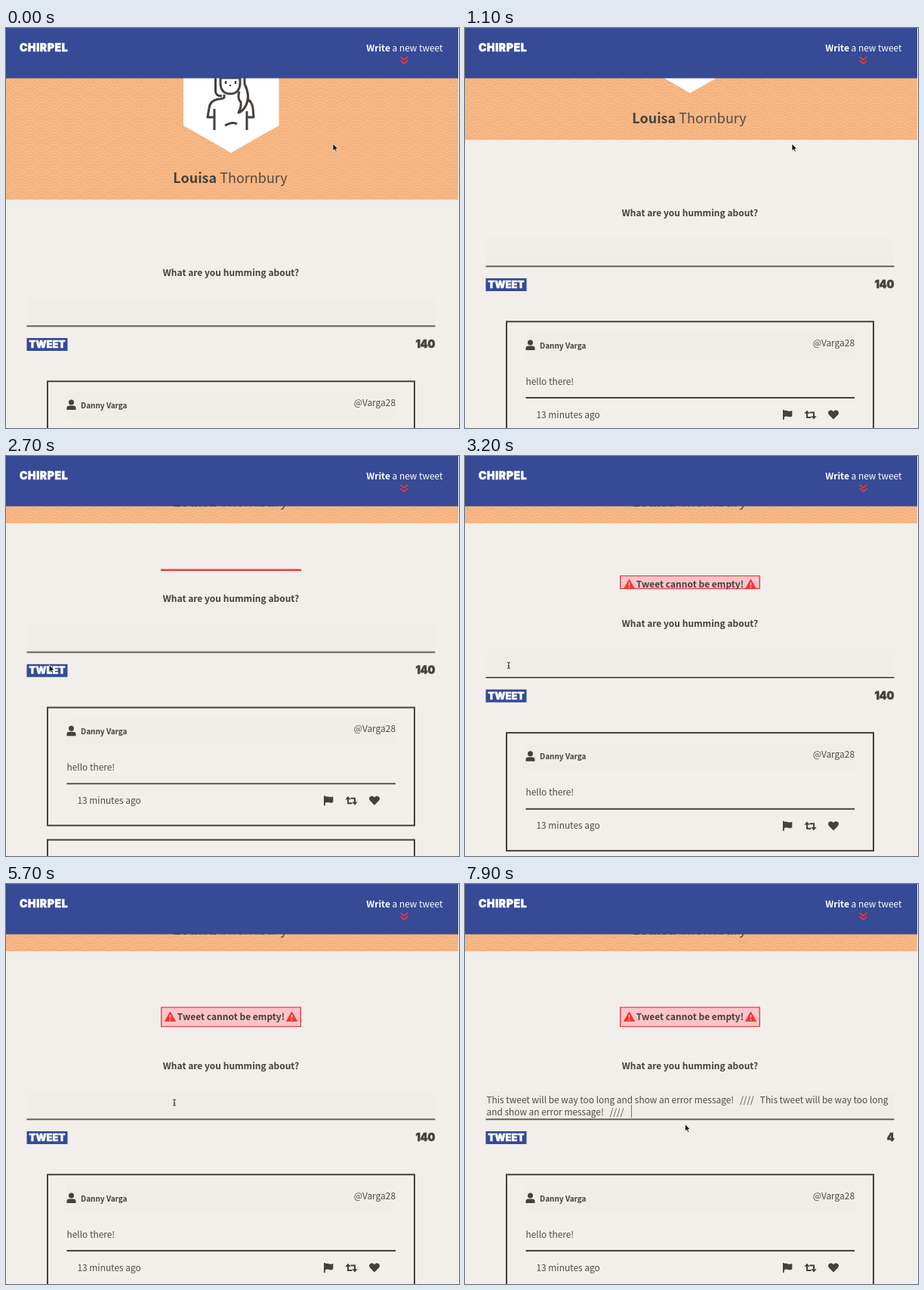
Write an HTML page that moves like this. It is 600 by 529 pixels and loops after 8000 ms.

```html
<!DOCTYPE html>
<html lang="en">
<head>
<meta charset="utf-8">
<title>New tweet</title>
<style>
html, body { margin: 0; width: 100%; height: 100%; overflow: hidden; background: #f2eeea }
#stage { display: block; width: 600px; height: 529px }
text { font: 400 11.9px 'Noto Sans CJK JP', 'Noto Sans CJK SC', 'Noto Sans CJK KR', 'Source Sans Pro', sans-serif; fill: #504b47; white-space: pre }
.bold { font-weight: 700; font-size: 12px; fill: #45413e }
.small { font-size: 10px }
.name { font-size: 18px }
.light { fill: #fff }
.block { font: 900 13px Inter, sans-serif; fill: #45413e; stroke: #45413e; stroke-width: .5 }
.block.light { fill: #fff; stroke: #fff }
.mid { text-anchor: middle }
.end { text-anchor: end }
.line { fill: none; stroke: #45413e; stroke-width: 2 }
.dark { fill: #45413e }
.tint { fill: #f0ede7 }
</style>
</head>
<body>
<svg id="stage" viewBox="0 0 600 529">
  <defs>
    <pattern id="waves" width="32" height="16" patternUnits="userSpaceOnUse">
      <rect width="32" height="16" fill="#f8b986"/>
      <g id="scales" fill="#f8b986" stroke="#eba876" stroke-width=".8"></g>
    </pattern>
    <g id="warn">
      <path d="M0-6.5L7 5.8H-7Z" fill="#ee3838" stroke="#ee3838" stroke-linejoin="round"/>
      <path d="M0-2.5V1.5M0 3V4.6" stroke="#fbc4c6" stroke-width="1.6"/>
    </g>
  </defs>
  <rect width="600" height="529" fill="#f2eeea"/>

  <g id="page">
    <rect width="599" height="227" fill="url(#waves)"/>
    <path d="M235 0H361.5V129L298 165L235 129Z" fill="#fff"/>
    <g class="line" style="stroke-width:3" stroke-linejoin="round">
      <path d="M277.5 40V84Q278 90 286 90M284 55V74Q285 87 297 87T310 74V55M284 66H310"/>
      <path d="M291 70V74M304 70V74M297 75V77" style="stroke-width:2.4"/>
      <path d="M289 88V92Q287 94 281 94Q270 96 269 106L267 118H276M276 107V135"/>
      <path d="M316 50V74Q324 90 318 102Q314 110 308 112Q312 104 311 98Q306 93 309 84"/>
      <path d="M319 94Q326 97 327 106L328 118H319M319 110V135M290 129Q300 123 306 127"/>
    </g>
    <text class="name mid" x="297" y="204.5"><tspan class="bold name">Louisa</tspan> Thornbury</text>

    <svg id="alert" x="205" width="186">
      <rect id="frame" x=".7" y=".7" width="184.6" fill="#fbc4c6" stroke="#e5404a" stroke-width="1.4"/>
      <g id="message">
        <use href="#warn" x="12.5" y="-4.3"/>
        <text class="bold mid" x="93" y="0">Tweet cannot be empty!</text>
        <use href="#warn" x="173.5" y="-4.3"/>
      </g>
    </svg>

    <g id="below">
      <text class="bold mid" x="298" y="327.5">What are you humming about?</text>
      <rect class="tint" x="28" y="357" width="540" height="36"/>
      <path class="line" d="M27.5 394.2H568.5" style="stroke:#64605d"/>
      <text id="row1" x="28.5" y="372.5"></text>
      <text id="row2" x="28.5" y="388.5"></text>
      <path id="caret" d="M0 0V17" stroke="#777" stroke-width="1"/>
      <rect x="27.5" y="410" width="54" height="17" fill="#364a96"/>
      <text class="block light mid" x="54.5" y="423">TWEET</text>
      <text id="count" class="block end" x="568.5" y="423" style="font-size:14px"></text>

      <rect class="line" x="55" y="467.3" width="486" height="156"/>
      <rect class="line" x="55" y="642.3" width="486" height="156"/>
      <rect class="tint" x="80.5" y="480" width="435" height="37"/>
      <circle class="dark" cx="86.5" cy="495" r="3.5"/>
      <path class="dark" d="M80.5 505V502.5Q80.5 499.5 84 499.5H89Q92.5 499.5 92.5 502.5V505Z"/>
      <text class="bold small" x="99" y="502.5">Danny Varga</text>
      <text class="end" x="516" y="500">@Varga28</text>
      <text x="80.5" y="550.5">hello there!</text>
      <path class="line" d="M80.5 568H516" style="stroke-width:1.8"/>
      <text x="94.5" y="594.5">13 minutes ago</text>
      <path class="dark" d="M421 584V597H422.8V593.4Q425.5 592 428 593T433.3 592.6V585Q430.5 586.3 428 585.4T422.8 585V584Z"/>
      <path class="line" d="M453 587V594H458.5M462 594.5V587.5H456.5"/>
      <path class="dark" d="M449.3 589L453 584.8L456.7 589ZM458.3 592.3L462 596.5L465.7 592.3Z"/>
      <path class="dark" d="M488 596.5L482 590.4C478.5 586 485 581.8 488 586.4C491 581.8 497.500 586 494 590.400Z"/>
    </g>
  </g>

  <rect width="600" height="66.500" fill="#364a96"/>
  <text class="block light" x="18" y="31" style="font-size:14px;letter-spacing:.6px">CHIRPEL</text>
  <text class="light end" x="578.5" y="31"><tspan class="bold light">Write</tspan> a new tweet</text>
  <path d="M522.5 38L527.5 42L532.5 38M522.5 43L527.5 47L532.5 43" fill="none" stroke="#e5353f" stroke-width="2"/>
  <rect x="599" width="1" height="529" fill="#f7f5f3"/>

  <path id="arrow" d="M0 0V9.5L2.2 7.6L3.8 11L5.3 10.300L3.8 7.100H6.700Z" fill="#111" stroke="#fff" stroke-width=".7"/>
  <path id="beam" d="M-2-4Q0-4 0-3Q0-4 2-4M0-3V3M-2 4Q0 4 0 3Q0 4 2 4M-1 .8H1" fill="none" stroke="#222"/>
</svg>
<script>
const LOOP = 8000, SCROLL = 138;
const FIRST_PASTE = 6300, SECOND_PASTE = 7000;
const $ = id => document.getElementById(id);
const set = (id, attrs) => { for (const k in attrs) $(id).setAttribute(k, attrs[k]); };
const move = (id, x, y) => set(id, { transform: `translate(${x} ${y})` });
const show = (id, on) => set(id, { visibility: on ? 'visible' : 'hidden' });
const part = (t, start, length) => Math.min(1, Math.max(0, (t - start) / length));
const smooth = u => u * u * (3 - 2 * u);

// Overlapping rows of concentric circles make the wave pattern.
let rings = '';
for (let row = 0; row < 5; row++)
  for (let x = row % 2 * 16 - 32; x <= 64; x += 32)
    for (const r of [16, 12, 8, 4])
      rings += `<circle cx="${x}" cy="${row * 8}" r="${r}"/>`;
$('scales').innerHTML = rings;

// Pointer stops: time, x, y
const stops = [
  [0, 433, 153], [1300, 433, 153], [2300, 57, 276], [3500, 58, 277], [4200, 225, 287],
  [5000, 225, 287], [5600, 223, 289], [7000, 223, 289], [7700, 291.500, 317.500], [LOOP, 291.500, 317.500]
];
function pointer(t) {
  const i = stops.findIndex(s => s[0] > t), a = stops[i - 1], b = stops[i];
  const u = smooth((t - a[0]) / (b[0] - a[0]));
  return [a[1] + (b[1] - a[1]) * u, a[2] + (b[2] - a[2]) * u];
}

const opening = 'This tweet will be way too long ', ending = 'and show an error message!   ////   ';
const phrase = opening + ending;

function draw(t) {
  const scroll = Math.round(SCROLL * smooth(part(t, 440, 1205)));
  move('page', 0, -scroll);

  // The alert slides open and pushes the form down.
  const p = .5 - Math.cos(Math.PI * part(t, 2600, 1000)) / 2;
  const push = p && 2 + 53 * p, height = 2.2 + 24.8 * p;
  show('alert', p > 0);
  set('alert', { y: 287 + 13.3 * p, height });
  set('frame', { height: height - 1.4 });
  move('message', 0, 14 + 3.6 * p);
  move('below', 0, push);

  const pastes = (t >= FIRST_PASTE) + (t >= SECOND_PASTE);
  $('row1').textContent = ['', phrase, phrase + opening][pastes];
  $('row2').textContent = pastes > 1 ? ending : '';
  $('count').textContent = 140 - pastes * phrase.length;
  show('caret', t > 6000 && t % 1000 > 450);
  move('caret', ...[[29, 359], [392, 359], [220.5, 375]][pastes]);

  const [x, y] = pointer(t), pageY = y + scroll - push;
  const overField = x > 28 && x < 568 && pageY > 357 && pageY < 395;
  move('arrow', x, y);
  move('beam', x, y);
  show('arrow', !overField);
  show('beam', overField);
}

const start = performance.now();
function tick() {
  draw((performance.now() - start) % LOOP);
  requestAnimationFrame(tick);
}
tick();
</script>
</body>
</html>
```
